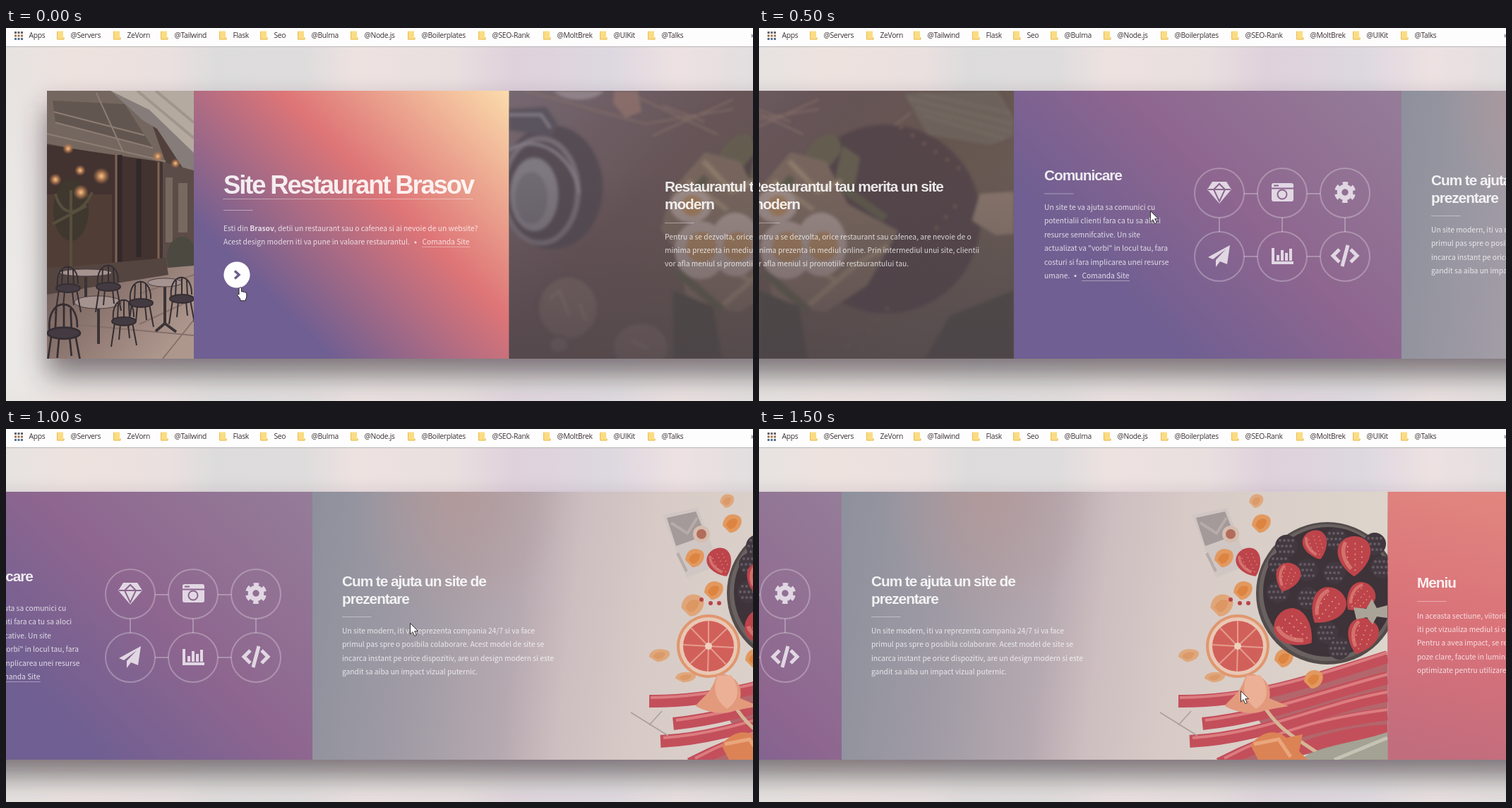
An HTML page that plays this animation: 1058 px wide and 529 px high, repeating every 2000 ms.

```html
<!DOCTYPE html>
<html lang="ro">
<head>
<meta charset="utf-8">
<title>Site Restaurant</title>
<style>
  html, body { margin: 0; width: 100%; height: 100%; overflow: hidden; }
  #stage { display: block; width: 1058px; height: 529px; }
  text { white-space: pre; }
  .bar text { font: 10.3px "Open Sans", "Noto Sans", sans-serif; letter-spacing: -.3px; fill: #3b3033; }
  .title { font: bold 20.8px "Liberation Sans", Arial, sans-serif; letter-spacing: -.05em; fill: #fff; fill-opacity: .88; }
  .big { font-size: 36.4px; letter-spacing: -.058em; }
  .body { font: 10.26px "Noto Sans CJK SC", "Noto Sans CJK JP", "Noto Sans CJK", "Noto Sans", sans-serif; fill: #fff; fill-opacity: .78; }
  .body tspan { font-weight: bold; }
  .rule { stroke: #fff; stroke-opacity: .4; }
  .dots { stroke: #fff; stroke-opacity: .75; stroke-dasharray: 1 1; }
  .rings { fill: none; stroke: #fff; stroke-opacity: .27; stroke-width: 2; }
  .icons { fill: #e1d7e3; }
  .cut { fill: none; stroke: #8c668f; stroke-width: 2; }
  .thick { fill: none; stroke: #e1d7e3; }
</style>
</head>
<body>
<svg id="stage" viewBox="0 0 1058 529">
  <defs>
    <linearGradient id="wall">
      <stop offset="0" stop-color="#e6e3e1"/><stop offset=".09" stop-color="#eee2df"/>
      <stop offset=".22" stop-color="#eae0df"/><stop offset=".28" stop-color="#dddcdd"/>
      <stop offset=".4" stop-color="#dfdcdd"/><stop offset=".47" stop-color="#eee2e1"/>
      <stop offset=".6" stop-color="#e9dfdf"/><stop offset=".68" stop-color="#dfd1dc"/>
      <stop offset=".81" stop-color="#ddd8e0"/><stop offset=".9" stop-color="#eee1e2"/>
      <stop offset="1" stop-color="#e2dedf"/>
    </linearGradient>
    <linearGradient id="haze" x2="0" y2="1">
      <stop offset="0" stop-color="#ecebe8" stop-opacity="0"/>
      <stop offset=".6" stop-color="#ecebe8" stop-opacity=".8"/>
      <stop offset=".93" stop-color="#ecebe8" stop-opacity=".75"/>
      <stop offset="1" stop-color="#ecebe8" stop-opacity=".25"/>
    </linearGradient>
    <linearGradient id="sunset" gradientUnits="userSpaceOnUse" x1="282" y1="486" x2="696" y2="72">
      <stop offset=".24" stop-color="#705f92"/><stop offset=".61" stop-color="#de7577"/><stop offset="1" stop-color="#fbdcab"/>
    </linearGradient>
    <linearGradient id="plum" gradientUnits="userSpaceOnUse" x1="1348" y1="511" x2="1813" y2="47">
      <stop offset=".27" stop-color="#705f92"/><stop offset=".58" stop-color="#8e668f"/><stop offset="1" stop-color="#957d99"/>
    </linearGradient>
    <linearGradient id="coral" gradientUnits="userSpaceOnUse" x1="2700" y1="469" x2="2800" y2="89">
      <stop offset="0" stop-color="#c16d7e"/><stop offset=".45" stop-color="#d87179"/><stop offset="1" stop-color="#e2867f"/>
    </linearGradient>
    <linearGradient id="wood" x2="1" y2=".6">
      <stop offset="0" stop-color="#766871"/><stop offset=".4" stop-color="#665457"/>
      <stop offset=".7" stop-color="#665650"/><stop offset="1" stop-color="#695c56"/>
    </linearGradient>
    <linearGradient id="dusk" x2="0" y2="1">
      <stop offset=".3" stop-color="#4a4148" stop-opacity="0"/><stop offset="1" stop-color="#4a4148" stop-opacity=".6"/>
    </linearGradient>
    <linearGradient id="floor" x2="1" y2=".6">
      <stop offset="0" stop-color="#6d5a57"/><stop offset=".5" stop-color="#8d7770"/><stop offset="1" stop-color="#ad978d"/>
    </linearGradient>
    <linearGradient id="table" y2=".06">
      <stop offset="0" stop-color="#8d909c"/><stop offset=".22" stop-color="#a09ba5"/>
      <stop offset=".4" stop-color="#b6a9b0"/><stop offset=".5" stop-color="#cdbec0"/>
      <stop offset=".65" stop-color="#d8cbc7"/><stop offset="1" stop-color="#ddd5cb"/>
    </linearGradient>
    <radialGradient id="blush">
      <stop offset="0" stop-color="#b69896" stop-opacity=".75"/><stop offset="1" stop-color="#b69896" stop-opacity="0"/>
    </radialGradient>
    <radialGradient id="lamp">
      <stop offset="0" stop-color="#f0c68b"/><stop offset=".35" stop-color="#c1875a"/><stop offset="1" stop-color="#a06a48" stop-opacity="0"/>
    </radialGradient>
    <filter id="soft" x="-10%" y="-40%" width="120%" height="180%"><feGaussianBlur stdDeviation="20"/></filter>
    <filter id="blur"><feGaussianBlur stdDeviation="2"/></filter>
    <filter id="smooth"><feGaussianBlur stdDeviation=".7"/></filter>
    <g id="chair" fill="none" stroke="#352e33" stroke-width="2">
      <path d="M-15 0C-19-36 15-38 14-4M-9-2-8-24M0-2V-28M8-2 7-24M-13 4-18 38M12 4 18 36M-5 6-7 28M6 6 8 26"/>
      <ellipse rx="17" ry="6" cy="2" fill="#433b41"/>
    </g>
    <g id="strawberry">
      <path d="M0 23C-13 15-23-2-14-13-6-22 9-21 15-12 22 0 11 16 0 23Z" fill="#bd444a"/>
      <path d="M-9-13C-15-3-9 9-3 15" fill="none" stroke="#d4716d" stroke-width="4"/>
      <path d="M-7-9V13M1-12V17M8-9V10" stroke="#dc9a87" stroke-width="1.2" stroke-dasharray="1.5 4"/>
    </g>
    <g id="blackberry">
      <circle r="16" fill="#423840"/>
      <path d="M-9-8H12M-12 0H12M-9 8H11" stroke="#665a62" stroke-width="4" stroke-linecap="round" stroke-dasharray="0 6"/>
    </g>
    <g id="petal">
      <path d="M-13 3C-12-13 2-17 12-9 18 1 7 14-3 13Z" fill="#e2995f"/>
      <path d="M-8 3C-6-6 2-9 8-5 8 3 2 9-3 8Z" fill="#dd8441"/>
    </g>
  </defs>

  <rect y="26" width="1058" height="503" fill="url(#wall)"/>
  <rect y="70" width="1058" height="459" fill="url(#haze)"/>

  <g id="track">
    <rect x="58" y="113" width="3200" height="380" fill="#32262f" opacity=".6" filter="url(#soft)"/>

    <!-- terrace -->
    <svg x="58" y="89" width="208" height="380" viewBox="58 89 208 380">
      <path d="M58 89H266V469H58Z" fill="#51403c"/>
      <g filter="url(#smooth)">
        <path d="M58 89H190L228 196 58 164Z" fill="#74675f"/>
        <path d="M66 103 168 108 208 170 70 134Z" fill="#625650"/>
        <path d="M70 134 208 170M68 119 196 152M58 150 226 189M128 92 166 176" fill="none" stroke="#8d7d73" stroke-width="2"/>
        <path d="M148 89H266V190L203 119Z" fill="#b5aaa0"/>
        <path d="M148 89 203 116 266 177V204L250 198 214 143 194 131Z" fill="#867c79"/>
        <path d="M186 89 266 156M212 89 266 134" stroke="#a1958e" stroke-width="4"/>
        <path d="M58 166 222 190V338H58Z" fill="#423230"/>
        <path d="M58 236H150V338H58Z" fill="#503d35"/>
        <path d="M161 180V340M188 186V325" stroke="#31282a" stroke-width="7"/>
        <path d="M156 178V340M216 190V342" stroke="#806353" stroke-width="3"/>
        <path d="M222 190 266 202V347H222Z" fill="#5c4c47"/>
        <path d="M226 212H236V304H226ZM244 220H257V290H244Z" fill="#776960"/>
        <ellipse cx="92" cy="258" rx="25" ry="44" fill="#3f382e"/>
        <path d="M70 235C79 270 106 268 122 233M66 278 114 252M92 230V340" fill="none" stroke="#584e3e" stroke-width="4"/>
        <ellipse cx="249" cy="325" rx="21" ry="29" fill="#4b4940"/>
        <path d="M58 355 266 337V469H58Z" fill="url(#floor)"/>
        <path d="M58 341 226 326 230 350 58 378Z" fill="#544540"/>
        <path d="M189 377 266 350M189 420 266 384M222 469 266 414M58 417 266 436" stroke="#85706a" stroke-width="2"/>
        <g fill="url(#lamp)">
          <circle cx="88" cy="171" r="8"/><circle cx="135" cy="210" r="12"/><circle cx="106" cy="233" r="11"/>
          <circle cx="105" cy="202" r="8"/><circle cx="70" cy="215" r="9"/><circle cx="215" cy="182" r="8"/><circle cx="240" cy="192" r="7"/>
        </g>
        <path d="M113 347V390M225 360V421M131 388V448M212 430 225 419 241 431" fill="none" stroke="#3b3436" stroke-width="4"/>
        <g fill="#a59390" stroke="#4a3e40">
          <ellipse cx="113" cy="347" rx="37" ry="5"/><ellipse cx="225" cy="361" rx="24" ry="6"/><ellipse cx="130" cy="389" rx="33" ry="9"/>
        </g>
        <use href="#chair" x="88" y="367"/><use href="#chair" x="145" y="365"/><use href="#chair" x="191" y="388"/>
        <use href="#chair" x="249" y="382"/><use href="#chair" x="167" y="414"/>
        <use href="#chair" transform="translate(82 430) scale(1.35)"/>
      </g>
    </svg>

    <rect x="266" y="89" width="446.5" height="380" fill="url(#sunset)"/>

    <!-- dark table -->
    <svg x="712.5" y="89" width="593.5" height="380" viewBox="712.5 89 593.5 380">
      <rect x="712" y="89" width="594" height="380" fill="url(#wood)"/>
      <g filter="url(#blur)" opacity=".82">
        <path d="M735 89 905 136 1030 115M875 89 1008 151M915 153 1030 101M930 110 990 133M1060 200 1160 120" fill="none" stroke="#8c746c" stroke-width="2"/>
        <ellipse cx="773" cy="226" rx="72" ry="88" fill="#514951"/>
        <ellipse cx="757" cy="231" rx="53" ry="74" fill="none" stroke="#78717a" stroke-width="7"/>
        <ellipse cx="748" cy="236" rx="34" ry="52" fill="#827e87"/><ellipse cx="744" cy="241" rx="23" ry="37" fill="#716d77"/>
        <path d="M712 115 765 112 781 135 774 154 712 145Z" fill="#57515b"/>
        <path d="M712 123H758L771 142M712 174C748 147 803 177 812 235" fill="none" stroke="#908c96" stroke-width="3"/>
        <path d="M776 89H847C838 103 792 108 776 89Z" fill="#978a90"/>
        <path d="M861 89H895L900 119 877 127 860 107Z" fill="#8f716d"/>
        <circle cx="1125" cy="271" r="134" fill="#514349"/>
        <path d="M1005 192C1022 144 1064 138 1061 176L1036 207ZM1064 167 1088 184 1080 226 1051 221Z" fill="#656150"/>
        <path d="M990 176 1040 190 1071 250 1142 288 1098 365 1039 403 966 391 950 318 927 285 944 229Z" fill="#7b6a60"/>
        <path d="M988 189 1028 231 1062 217M965 217 1022 258M950 348 996 322 1054 359M1007 400 1086 333 1128 309" fill="none" stroke="#95826f" stroke-width="7"/>
        <path d="M950 345 1015 400M1065 228 1124 270M962 248 992 211" stroke="#5c5a4c" stroke-width="12"/>
        <g fill="#aa9a95">
          <ellipse cx="984" cy="315" rx="37" ry="41"/><ellipse cx="1033" cy="307" rx="36" ry="45"/><ellipse cx="970" cy="252" rx="29" ry="24"/>
        </g>
        <g fill="#a8825c">
          <circle cx="985" cy="311" r="22"/><circle cx="1036" cy="310" r="21"/><circle cx="972" cy="252" r="15"/>
        </g>
        <path d="M1150 93 1283 89 1306 127V154L1271 166 1184 151Z" fill="#70665f"/>
        <path d="M1160 101 1304 136M1169 114 1300 147M1180 125 1290 156M1174 93 1302 121" stroke="#928479" stroke-width="3" stroke-dasharray="2 5"/>
        <path d="M1258 235 1306 232V292L1280 294 1247 273Z" fill="#8f7c71"/>
        <path d="M945 372 1002 395 1014 469H945ZM1215 408 1306 372V469H1180Z" fill="#4b4a45"/>
        <g fill="#7b6965" stroke="#62545a" stroke-width="4">
          <ellipse cx="796" cy="397" rx="43" ry="45"/><ellipse cx="899" cy="452" rx="40" ry="34"/><ellipse cx="783" cy="449" rx="14" ry="12"/>
        </g>
        <path d="M770 385 784 372 798 409M812 391 822 415M886 443 910 455" fill="none" stroke="#8d7b75" stroke-width="4"/>
        <path d="M1100 430 1130 394M1170 315 1225 250M1145 140 1230 200M1070 450 1108 461" stroke="#8f705d" stroke-width="3" stroke-dasharray="3 17"/>
      </g>
      <rect x="712" y="89" width="594" height="380" fill="url(#dusk)"/>
    </svg>

    <rect x="1306" y="89" width="549" height="380" fill="url(#plum)"/>
    <g transform="translate(1597 234)">
      <g class="rings">
        <circle r="35"/><circle cx="89" r="35"/><circle cx="178" r="35"/>
        <circle cy="90" r="35"/><circle cx="89" cy="90" r="35"/><circle cx="178" cy="90" r="35"/>
        <path d="M35 1H54M124 1H143M35 90H54M124 90H143M0 35V55M89 35V55M178 35V55"/>
      </g>
      <g class="icons">
        <path d="M-10-16H10L17-5 0 15-17-5Z"/>
        <path class="cut" d="M-16-5H16M-8-5 0 12 8-5 0-13Z"/>
        <rect x="74" y="-14" width="31" height="26" rx="3"/>
        <path class="cut" d="M74-6.5H105M77-10.5H84"/><circle class="cut" cx="89" cy="2" r="6.5"/>
        <g class="thick" transform="translate(178 -1)">
          <circle r="8" stroke-width="6.5"/><circle r="12.6" stroke-width="5" stroke-dasharray="7.2 5.995" stroke-dashoffset="-3"/>
        </g>
        <path d="M15 74 11 101 1 97-5 105V95L9 80-9 94-16 91Z"/>
        <path class="thick" stroke-width="4" d="M76 78V99H105"/>
        <path class="thick" stroke-width="4" d="M83 96V88M89 96V81M95 96V85M101 96V79"/>
        <path class="thick" stroke-width="5" d="M170 80 161 89 170 98M186 80 195 89 186 98M182 74 174 104"/>
      </g>
    </g>

    <!-- fruit table -->
    <svg x="1855" y="89" width="773.5" height="380" viewBox="117 89 773.5 380">
      <rect x="117" y="89" width="774" height="380" fill="url(#table)"/>
      <ellipse cx="325" cy="89" rx="150" ry="190" fill="url(#blush)"/>
      <g filter="url(#smooth)">
        <path d="M613 122 663 112 693 193 647 211Z" fill="#d0c6c3"/>
        <path d="M619 126 660 117 674 151 632 166Z" fill="#a39a99"/>
        <circle cx="668" cy="149" r="12" fill="#d5bdb0"/><circle cx="668" cy="149" r="7" fill="#b26c5a"/>
        <path d="M634 176 647 202M625 133 648 148 662 126" fill="none" stroke="#b7aca9" stroke-width="4"/>
        <use href="#petal" x="711" y="134"/><use href="#petal" transform="translate(704 102) scale(.75)" opacity=".7"/>
        <use href="#petal" x="658" y="183"/><use href="#petal" x="685" y="229"/>
        <use href="#petal" transform="translate(655 250) scale(1.2)" opacity=".75"/>
        <use href="#petal" transform="translate(608 321) scale(1.1 .7)" opacity=".7"/>
        <use href="#petal" transform="translate(645 352) scale(1.1 .55)" opacity=".7"/>
        <use href="#petal" x="743" y="325"/>
        <use href="#strawberry" transform="translate(694 188) rotate(-25)"/>
        <g fill="#b84348"><circle cx="668" cy="242" r="3"/><circle cx="681" cy="247" r="3"/><circle cx="693" cy="247" r="3"/></g>
        <path d="M690 385 890 320V440L735 469H660L720 432Z" fill="#b3666b"/>
        <g fill="none" stroke="#c34f5b" stroke-width="18">
          <path d="M594 386C690 387 770 362 890 323"/><path d="M628 418C720 409 790 378 890 353"/>
          <path d="M610 443C715 438 795 395 890 378"/><path d="M652 475C735 432 810 414 890 404"/><path d="M715 478C775 445 832 431 890 428"/>
        </g>
        <g fill="none" stroke="#dc7d80" stroke-width="4">
          <path d="M596 381C700 380 780 353 890 317"/><path d="M632 413C725 402 795 373 890 348"/>
          <path d="M614 438C719 431 799 389 890 373"/><path d="M659 467C740 424 812 408 890 398"/>
        </g>
        <path d="M568 402 621 435M594 420 612 400" stroke="#aa9f9b" stroke-width="1.5"/>
        <use href="#petal" x="785" y="355"/>
        <circle cx="805" cy="233" r="101" fill="#534c4b"/><circle cx="805" cy="232" r="97" fill="#6a6261"/><circle cx="806" cy="231" r="92" fill="#3d3338"/>
        <use href="#blackberry" x="747" y="166"/><use href="#blackberry" x="776" y="200"/><use href="#blackberry" x="817" y="156"/>
        <use href="#blackberry" x="815" y="204"/><use href="#blackberry" x="778" y="240"/><use href="#blackberry" x="735" y="231"/>
        <use href="#blackberry" x="872" y="163"/><use href="#blackberry" x="882" y="196"/><use href="#blackberry" x="805" y="289"/>
        <use href="#blackberry" x="822" y="311"/><use href="#blackberry" x="737" y="192"/>
        <use href="#strawberry" transform="translate(788 163) rotate(-18)"/>
        <use href="#strawberry" transform="translate(843 178) scale(1.35)"/>
        <use href="#strawberry" transform="translate(749 209) rotate(20)"/>
        <use href="#strawberry" transform="translate(806 250) rotate(38) scale(1.35)"/>
        <use href="#strawberry" transform="translate(757 282) rotate(-50) scale(1.45)"/>
        <use href="#strawberry" transform="translate(852 238) rotate(45) scale(1.1)"/>
        <use href="#strawberry" transform="translate(855 292) rotate(20) scale(1.25)"/>
        <path d="M842 253 860 255 868 241 875 254 890 250V268L875 266 869 277 861 267 846 270Z" fill="#aaa498"/>
        <circle cx="678" cy="308" r="45" fill="#e0976f"/><circle cx="678" cy="308" r="41" fill="#e9c8b5"/><circle cx="678" cy="308" r="36" fill="#d2605a"/>
        <path d="M678 308V272M678 308 704 283M678 308 714 310M678 308 703 334M678 308 677 344M678 308 652 333M678 308 642 306M678 308 653 282" stroke="#e39d8e" stroke-width="2"/>
        <circle cx="678" cy="308" r="5" fill="#efd0bc"/>
        <path d="M712 388C736 428 758 436 792 460" fill="none" stroke="#d6b595" stroke-width="5"/>
        <path d="M766 469C792 449 842 446 890 430V469Z" fill="#a4a294"/><path d="M815 469 890 438" stroke="#c7c3b4" stroke-width="5"/>
        <path d="M660 393C669 379 681 378 690 348 704 344 728 356 723 382L750 393 716 399C701 406 678 403 660 393Z" fill="#e2997c"/>
        <path d="M691 350C682 371 690 386 704 397 721 386 724 369 710 349Z" fill="#ebb095"/>
        <path d="M696 448C714 427 733 426 747 438L770 433 765 457 777 469H707Z" fill="#dc8355"/>
        <path d="M701 447 736 440 753 465" fill="none" stroke="#e9a67d" stroke-width="5"/>
      </g>
    </svg>

    <rect x="2628.5" y="89" width="630" height="380" fill="url(#coral)"/>

    <g id="copy">
      <path class="dots" d="M308 242.5H662"/>
      <circle cx="327" cy="350" r="18.6" fill="#fff"/>
      <path d="M324 344.5 330 350 324 355.5" fill="none" stroke="#6b5c8c" stroke-width="3.4"/>
    </g>
  </g>

  <g class="bar" id="bar">
    <rect width="1058" height="26" fill="#fdfdfd"/><path d="M0 26.5H1058" stroke="#b9b5b6"/>
    <g stroke-width="3" stroke-dasharray="3 1.5" fill="none">
      <path d="M12 6.5H24" stroke="#666067"/><path d="M12 11H24" stroke="#a0724f"/><path d="M12 15.5H24" stroke="#59728f"/>
    </g>
    <text x="32.5" y="14">Apps</text><text x="1055" y="14">»</text>
  </g>

  <path id="arrow" d="M.5.5V16L4 12.7 6.7 18.5 9.3 17.4 6.7 11.7H11.5Z" fill="#fff" stroke="#333"/>
  <path id="hand" d="M3 2q1.7-2.6 3.4 0v5q1.4-1 2.6.4 1.5-.9 2.5.6 2.3-.4 2.3 1.8v4q0 2.7-1.6 4v2H5v-2L.6 11.6q0-2 1.6-1.3l.8.8z" fill="#fff" stroke="#222"/>
</svg>

<script>
const $ = id => document.getElementById(id);

function add(parent, tag, attrs, text = '') {
  const node = document.createElementNS('http://www.w3.org/2000/svg', tag);
  for (const key in attrs) node.setAttribute(key, attrs[key]);
  node.textContent = text;
  return parent.appendChild(node);
}

const copy = $('copy');

function lines(cls, x, y, step, list) {
  list.forEach((text, i) => add(copy, 'text', { class: cls, x, y: y + i * step }, text));
}

function block(x, titleY, titles, ruleY, bodyY, body, cls = 'title') {
  lines(cls, x, titleY, 25, titles);
  add(copy, 'path', { class: 'rule', d: `M${x} ${ruleY}h41.5` });
  lines('body', x, bodyY, 19.4, body);
}

function orderLink(x, y) {
  add(copy, 'circle', { class: 'body', cx: x - 9.5, cy: y - 3.5, r: 1.5 });
  add(copy, 'text', { class: 'body', x, y }, 'Comanda Site');
  add(copy, 'path', { class: 'dots', d: `M${x} ${Math.round(y) + 3.5}h68` });
}

block(308, 235, ['Site Restaurant Brasov'], 258.5, 288,
  ['', 'Acest design modern iti va pune in valoare restaurantul.'], 'title big');
add(copy, 'text', { class: 'body', x: 308, y: 288 }).innerHTML =
  'Esti din <tspan>Brasov</tspan>, detii un restaurant sau o cafenea si ai nevoie de un website?';
orderLink(589.5, 307.4);
block(933, 232, ['Restaurantul tau merita un site', 'modern'], 276.5, 299.5, [
  'Pentru a se dezvolta, orice restaurant sau cafenea, are nevoie de o',
  'minima prezenta in mediul online. Prin intermediul unui site, clientii',
  'vor afla meniul si promotiile restaurantului tau.']);
block(1349, 215.5, ['Comunicare'], 235, 258, [
  'Un site te va ajuta sa comunici cu',
  'potentialii clienti fara ca tu sa aloci',
  'resurse semnifcative. Un site',
  'actualizat va "vorbi" in locul tau, fara',
  'costuri si fara implicarea unei resurse',
  'umane.']);
orderLink(1402.5, 355);
block(1897, 222.5, ['Cum te ajuta un site de', 'prezentare'], 266.5, 290, [
  'Un site modern, iti va reprezenta compania 24/7 si va face',
  'primul pas spre o posibila colaborare. Acest model de site se',
  'incarca instant pe orice dispozitiv, are un design modern si este',
  'gandit sa aiba un impact vizual puternic.']);
block(2670, 225, ['Meniu'], 244.5, 268.5, [
  'In aceasta sectiune, viitorii clienti',
  'iti pot vizualiza mediul si oferta.',
  'Pentru a avea impact, se recomanda',
  'poze clare, facute in lumina buna,',
  'optimizate pentru utilizare web.']);

const bookmarks = {
  '@Servers': 72, ZeVorn: 152, '@Tailwind': 219, Flask: 302, Seo: 360, '@Bulma': 413, '@Node.js': 488,
  '@Boilerplates': 569, '@SEO-Rank': 669, '@MoltBrek': 761, '@UIKit': 841, '@Talks': 909
};
for (const [name, x] of Object.entries(bookmarks)) {
  add($('bar'), 'path', { d: `M${x} 4.5h9v9h1.5v3h-10.5z`, fill: '#fbdc83' });
  add($('bar'), 'path', { d: `M${x + .5} 5v11h9.5v-2.5`, fill: 'none', stroke: '#e6bd57' });
  add($('bar'), 'text', { x: x + 19.5, y: 14 }, name);
}

const stops = [
  { scroll: 0, x: 327, y: 367, hand: true },
  { scroll: 945, x: 554, y: 259 },
  { scroll: 1421, x: 572, y: 275 },
  { scroll: 1738, x: 682, y: 371 }
];
const start = performance.now();
let shown;

function draw() {
  const stop = stops[Math.floor((performance.now() - start) / 500) % stops.length];
  if (stop !== shown) {
    shown = stop;
    $('track').setAttribute('transform', `translate(${-stop.scroll} 0)`);
    for (const id of ['arrow', 'hand']) {
      $(id).setAttribute('transform', `translate(${stop.x} ${stop.y})`);
      $(id).style.display = (id === 'hand') === !!stop.hand ? '' : 'none';
    }
  }
  requestAnimationFrame(draw);
}
draw();
</script>
</body>
</html>
```
